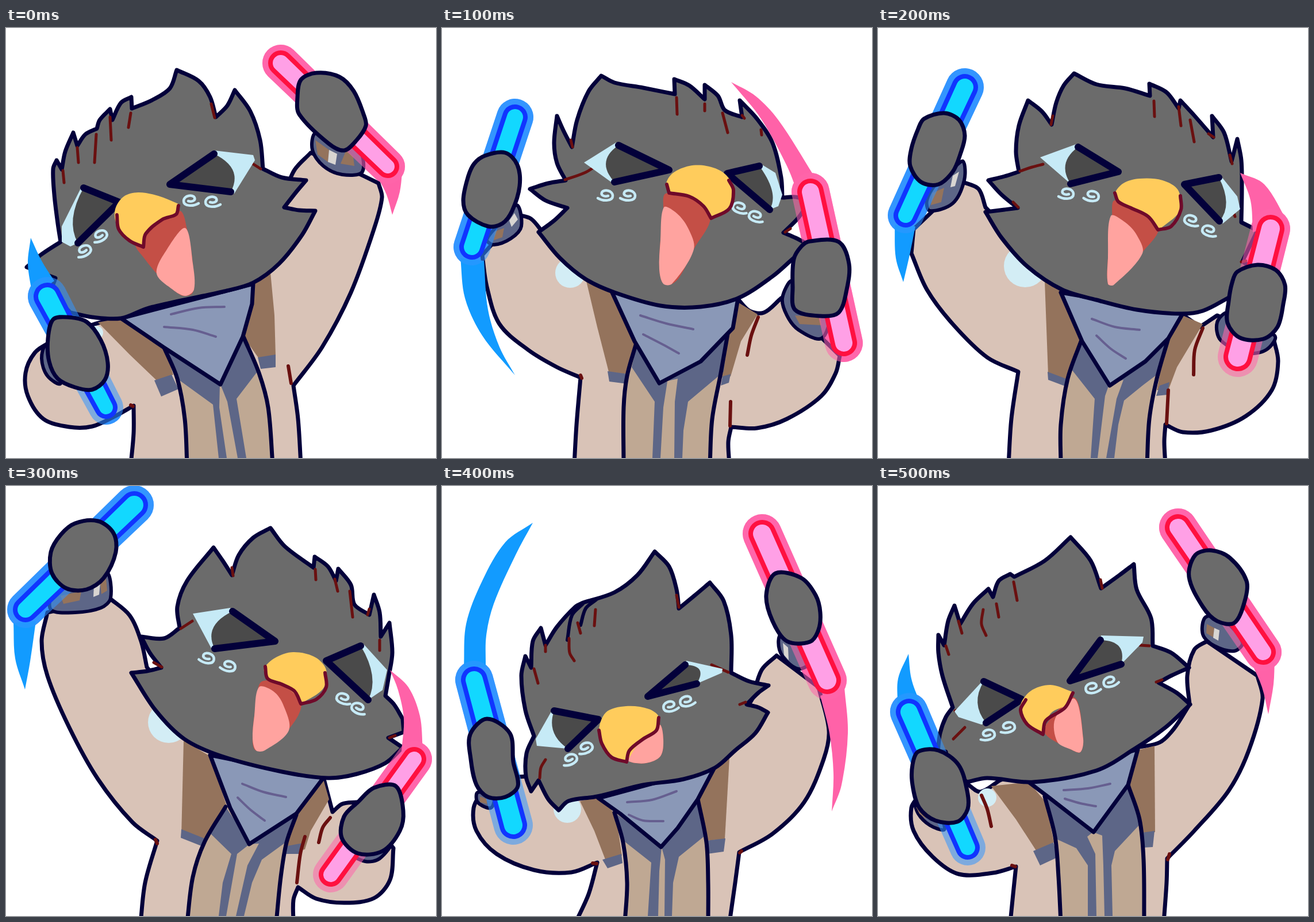
These frames come from a looping animation (748x748 px, 600 ms). An HTML page:

```html
<!DOCTYPE html>
<html lang="en">
<head>
<meta charset="utf-8">
<title>Glow stick dance</title>
<style>
html, body { margin: 0; width: 100%; height: 100%; overflow: hidden; background: #fff; }
svg { display: block; width: 100vw; height: 100vh; }
</style>
</head>
<body>
<svg id="stage" viewBox="0 0 748 748" stroke-linecap="round" stroke-linejoin="round"></svg>
<script>
// Points are "x,y"; "!" marks a sharp corner and "/" starts a new shape.
// Eyes: three lid points, then the outer rim. Sticks: x,y,radius for both ends (blue / pink).
const poses = [
  {
    body: '217,760! 222,705 222,657! 190,675 150,693 110,694 65,680 38,640 34,600 50,565 75,548 148,517 180,508 205,500! 430,440! 470,330! 500,250 530,217! 575,235 648,270! 654,295 640,350 600,460 550,555 500,622! 508,680 513,760!',
    creases: '491,588 496,618/217,656 221,658',
    badge: '157,530,12',
    brown: '160,512 200,505 275,555 291,603 262,613 215,568/428,445 460,425 467,500 469,570 440,575 413,537',
    slate: '258,613 288,603 300,628 270,641/438,573 469,568 469,590 443,593',
    panel: '275,556 298,610 311,680 315,760/413,537 440,600 456,660 464,760',
    collar: '275,556 372,620 371,660 384,748 370,748 360,655 302,613/413,537 373,620 385,650 403,748 418,748 401,645 437,598',
    scarf: '200,505 430,445 428,480 412,537 373,620 275,556',
    folds: '287,498 335,487 380,485/275,520 325,525 365,537',
    head: '95,372! 90,340 84,290 82,245 88,230! 97,246! 103,215 117,182! 124,205! 138,185 158,175! 163,160 181,141! 185,160! 200,130 218,120! 219,140! 255,125 285,105 297,73! 335,92 355,120 365,155! 385,135 398,108! 425,145 442,195 447,245! 480,260 522,265! 505,285 484,312! 510,317 538,318! 515,360 475,410 430,443 380,458 300,475 245,488 200,505 150,503 112,495! 80,460 86,435! 60,425 36,416! 60,395 95,372',
    cuts: '99,248 101,269/124,208 126,234/157,185 154,234/181,155 183,195/217,148 213,173/357,132 363,156/429,236 443,245',
    eyes: ['362,219 285,272 391,285 397,288 433,230 430,221 362,213', '135,278 197,303 125,374 112,380 97,372 97,345 131,277'],
    mouth: '225,375 240,400 265,430 305,465 325,460 325,410 315,350 302,318 250,345',
    tongue: '262,427 280,385 312,348 325,410 327,455 312,466 290,455',
    beak: '192,340 190,315 205,293 230,286 265,292 300,306! 300,318 290,330 268,334 246,350 240,380! 215,370',
    lip: '193,325 196,350 215,370 239,381! 243,358 272,333 296,324 300,309',
    swirls: '163,362,-30,-1 135,388,-30,-1 322,300,0,1 360,302,0,1',
    trails: ['43,365! 38,410 46,465! 84,440! 62,405', '648,262! 690,240! 685,285 672,325! 662,290'],
    cuffs: '70,550 62,575 72,605 95,618 95,550/538,183 533,212 552,240 585,255 620,250 612,205 570,195',
    patch: '538,195 562,212 560,233 542,220/592,212 604,224 606,240 582,236',
    pale: '562,212 576,219 573,238 560,233',
    sticks: ['72,467,24,174,660,20', '478,61,22,664,241,20'],
    hands: '82,507 107,503 140,511 165,543 177,582 172,612 150,629 120,625 90,610 75,580 73,540/540,78 580,85 605,110 622,150 626,170 610,195 588,213 560,200 510,150 507,120 513,90'
  },
  {
    body: '230,760! 234,690 241,608! 200,590 150,560 100,515 78,450 70,395! 133,325! 155,332 175,355! 250,400! 515,472! 535,492 560,495 590,470! 692,570! 685,600 660,640 600,680 548,696 503,694! 498,720 500,760!',
    creases: '241,604 243,609/550,503 538,535 531,569/502,650 501,692',
    badge: '223,426,26',
    brown: '250,436 292,455 337,548 328,603 290,598 270,520/513,476 549,498 520,545 502,606 487,608 497,540',
    slate: '288,597 331,603 330,620 291,615/488,606 502,602 499,617 485,622',
    panel: '338,548 322,605 316,660 316,760/500,515 485,600 470,680 466,760',
    collar: '340,545 376,618 392,615 385,660 380,748 366,748 370,650 330,590/500,510 460,555 375,618 410,610 405,650 404,748 418,748 420,700 428,650 490,598',
    scarf: '295,458 515,470 506,522 450,580 378,618 335,545',
    folds: '345,500 390,514 437,524/350,533 385,551 412,566',
    head: '153,280! 185,270 215,265! 200,235 195,200 200,153! 212,180 226,207! 235,160 255,110 277,83! 300,95 350,104 405,115! 404,89! 430,100 457,124! 457,99! 480,118 492,143 522,155! 518,126! 548,158 575,200 590,260 592,295! 615,294 640,300! 620,330 594,356! 615,365 640,378! 612,400 575,432 515,470 450,485 380,483 300,460 250,437 205,400 168,355! 195,335 218,313! 180,300 153,280',
    cuts: '408,121 409,150/457,132 457,144/488,148 497,182/522,152 526,157/555,177 556,186/224,195 227,207/597,355 606,349/214,264 250,251 273,236',
    eyes: ['307,204 395,247 300,268 297,270 247,234 303,199', '552,240 496,253 570,316 585,310 592,290 580,252 557,238'],
    mouth: '389,288 385,320 378,400 382,440 395,447 412,435 438,385 467,330 440,295',
    tongue: '386,312 380,370 378,420 385,445 400,445 438,385 428,348 408,322',
    beak: '390,270 402,252 430,240 460,240 490,252 507,278 500,312 469,332! 455,310 430,294 394,286!',
    lip: '391,272 395,287! 430,293 455,310 468,331! 500,314 507,282 499,265',
    swirls: '284,291,0,-1 323,291,0,-1 519,313,20,1 547,328,20,1',
    trails: ['32,400! 40,470 70,535 127,604! 100,555 80,490 73,405!', '503,94! 545,118 585,160 652,265! 645,290! 618,285! 600,240 555,158'],
    cuffs: '100,340 130,308 138,345 120,366 90,377 78,368/608,440 592,470 600,500 620,525 660,540 672,500 620,488',
    patch: '92,354 108,348 105,364 90,369/614,500 658,503 660,517 622,515',
    pale: '117,335 126,322 132,333 121,346',
    sticks: ['127,155,22,52,381,22', '641,285,23,699,548,23'],
    hands: '75,222 110,217 131,238 135,275 122,318 105,340 80,345 45,325 37,300 45,260 56,236/640,371 690,372 708,410 704,455 690,495 658,501 614,490 610,450 612,402 625,380'
  },
  {
    body: '227,760! 232,680 244,598! 190,573 130,515 85,455 58,392! 62,350! 148,268! 175,280 187,312! 300,430! 525,495! 560,520! 590,500! 688,540! 696,580 685,630 640,675 580,700 530,703 500,690! 498,720 500,760!',
    creases: '565,522 551,560 549,603/505,630 502,688',
    badge: '256,414,37',
    brown: '290,440 325,460 354,545 330,622 296,603/530,500 565,515 520,590 505,630 485,630 500,550',
    slate: '295,598 332,612 328,624 296,612/490,622 507,616 503,638 484,640',
    panel: '355,540 330,610 318,690 318,760/505,540 485,610 472,680 468,760',
    collar: '355,540 402,620 395,640 382,748 370,748 377,645 336,593/505,540 470,570 402,620 427,612 415,645 397,748 411,748 418,690 428,648 460,622 489,600',
    scarf: '318,460 530,497 505,540 465,580 403,622 355,545',
    folds: '372,506 412,520 455,525/380,535 405,558 431,575',
    head: '192,265! 220,258 245,250! 240,215 245,170 261,126! 285,145 302,168! 310,130 323,100 341,79! 380,98 430,105 473,118! 472,97! 502,112 523,140! 526,126! 550,152 583,190! 581,153! 602,182 615,232! 625,193! 632,230 633,280 632,338! 660,352! 634,406! 655,420! 612,468! 565,492 525,497 450,490 380,473 320,455 260,415 215,365 187,320! 220,316 243,313! 215,290 192,265',
    cuts: '247,249 268,242 287,237/235,303 244,312/304,153 301,168/480,127 481,154/523,137 527,170/543,160 550,198/575,184 584,190/612,221 616,236/618,319 621,328/632,407 640,405',
    eyes: ['348,207 418,250 335,271 282,225 345,202', '593,260 533,272 594,336 600,340 630,315 625,293 597,258'],
    mouth: '411,300 407,330 400,400 400,445 410,446 460,390 488,348 450,315',
    tongue: '405,327 400,400 400,445 410,447 460,392 450,360 430,338',
    beak: '412,288 427,270 455,262 495,265 522,282 525,318 490,350! 470,330 440,315 417,304!',
    lip: '412,287 418,302 440,313 470,328 487,351! 510,345 527,316 526,292',
    swirls: '327,288,0,-1 371,292,5,-1 546,335,20,1 577,353,20,1',
    trails: ['29,343! 31,400 44,442! 55,395 65,345!', '630,252! 672,272 714,340! 652,355! 648,300'],
    cuffs: '130,245 148,232 150,265 130,305 90,318 85,300 100,272/610,495 590,512 596,543 640,565 675,560 690,535',
    patch: '95,287 115,278 110,303 92,308',
    pale: '130,257 141,250 134,275 126,277',
    sticks: ['151,103,23,48,326,21', '683,349,24,626,572,25'],
    hands: '80,158 115,148 141,160 151,187 143,220 130,250 105,272 75,268 56,240 58,210 70,175/625,424 660,412 692,421 708,447 705,480 695,520 670,541 630,539 608,513 610,475 616,443'
  },
  {
    body: '234,760! 242,690 263,617! 220,585 160,510 110,420 72,330 62,270 72,220! 180,195! 215,225 235,270 245,315! 330,430! 553,510! 568,567! 585,553 610,550! 674,630! 668,685 640,717 590,725 540,718 508,698! 500,720 500,760!',
    creases: '564,577 551,594 544,620/520,610 512,640 506,690/260,615 263,622',
    badge: '283,411,36',
    brown: '309,443 355,470 384,557 345,625 305,610/552,510 562,545 530,600 520,632 487,640 500,572',
    slate: '305,597 345,613 342,627 304,612/490,626 517,621 512,640 484,640',
    panel: '382,558 345,620 325,680 315,760/505,572 488,620 478,680 470,760',
    collar: '382,558 425,622 402,640 383,748 370,748 377,690 392,640 355,604/505,572 423,623 440,622 420,660 400,748 414,748 428,690 445,650 489,618',
    scarf: '355,468 552,508 505,570 423,623 390,560',
    folds: '411,518 447,532 487,541/403,542 425,563 450,582',
    head: '235,262! 275,265 302,247! 298,210 315,165 361,107! 377,130 393,155! 405,120 430,90 460,73! 485,105 535,142! 537,123! 560,140 574,165! 578,144! 600,172 606,206 632,224! 640,189! 650,220 652,262! 667,238! 672,290 666,330 660,365! 675,380 690,405! 692,428! 665,438! 690,455! 660,482 610,501 560,508 480,497 375,470 310,440 260,390 218,325! 245,322 270,316! 250,290 235,262',
    cuts: '304,248 324,235/257,307 271,315/393,142 395,156/538,145 539,163/572,162 577,183/598,183 603,228/632,214 629,224/650,268 650,286/667,438 677,434',
    eyes: ['394,218 468,270 363,283 357,282 325,222 390,212', '617,278 557,304 630,372 655,355 663,320 622,275'],
    mouth: '445,340 435,380 429,430 432,458 445,460 490,425 514,380 490,350',
    tongue: '440,350 432,400 429,440 435,460 450,460 492,425 482,380 465,357',
    beak: '449,318 468,299 500,289 538,298 557,320 552,352 515,378! 498,358 475,344 454,335!',
    lip: '451,314 455,335 480,345 502,357 513,379! 540,371 557,350 555,325',
    swirls: '349,299,10,-1 386,313,10,-1 588,370,20,1 614,387,25,1',
    trails: ['13,238! 16,300 33,354! 42,305 52,235!', '668,320! 700,350 720,400 725,458! 688,462! 692,405 682,355'],
    cuffs: '85,180 78,215 120,220 165,212 182,195 175,150 140,175/600,638 625,653 650,648 670,620',
    patch: '95,191 131,183 128,199 100,205/164,170 174,160 176,182 166,188',
    pale: '153,173 164,168 162,189 152,193',
    sticks: ['223,33,24,34,215,22', '710,475,21,565,676,21'],
    hands: '120,65 160,61 187,82 191,115 170,160 140,180 105,178 80,152 78,115 95,85/640,525 678,522 691,565 685,600 655,635 612,639 584,612 588,575 612,550'
  },
  {
    body: '232,760! 255,710 270,655! 225,672 160,668 95,640 60,600 55,560 70,530! 130,507 152,505! 200,530! 475,480! 540,370! 556,320 582,295! 655,350! 673,425 664,475 630,550 575,605 517,637! 510,690 500,760!',
    creases: '262,656 269,657/518,638 521,635',
    badge: '218,562,24',
    brown: '240,548 278,540 303,575 313,643 285,652 265,600/472,490 500,473 492,614 460,617 445,547',
    slate: '279,650 312,640 314,656 288,665/459,617 493,613 490,636 461,640',
    panel: '300,568 315,620 322,690 318,760/445,545 460,620 463,690 463,760',
    collar: '300,568 382,628 378,670 376,748 358,748 364,655 317,618/445,545 382,628 388,650 387,748 400,748 402,690 412,645 459,607',
    scarf: '272,543 475,488 445,545 410,595 381,628 310,570',
    folds: '322,550 365,546 408,531/325,572 350,582 385,583',
    head: '160,435! 145,390 138,330 145,296! 155,316! 158,270 172,247! 180,277! 200,245 232,210 245,203! 300,185 340,155 370,114! 395,140 408,180 412,213! 440,190 466,168! 490,200 503,260 503,325! 535,340 568,347! 550,360 530,380! 550,385 567,394! 545,430 510,460 475,490 420,510 350,520 270,540 220,548 203,564! 185,545 168,512! 155,531! 146,505 147,465 160,435',
    strands: '218,268 226,225 245,205/241,242 250,213 268,198',
    cuts: '160,318 167,343/180,277 180,288/221,265 222,290 230,304/236,238 241,256/267,215 265,243/408,190 412,211/469,311 498,324/518,380 528,376/180,476 172,490 170,508',
    eyes: ['423,311 358,366 443,344 487,325 488,318 425,304', '195,391 272,406 219,457 165,452 163,440 192,389'],
    mouth: '325,470 345,445 378,415 385,440 380,470 355,482 325,479',
    tongue: '325,470 345,445 378,415 385,440 380,470 355,482 325,479',
    beak: '273,430 285,394 320,383 360,388 378,403 372,427 345,444 322,479! 290,465',
    lip: '273,425 278,448 295,472 321,480! 326,460 350,440 373,425 377,403',
    swirls: '222,476,-25,-1 249,456,-25,-1 398,383,-10,1 427,374,-10,1',
    trails: ['158,64! 128,120 90,205 77,260 76,315! 38,315! 42,240 70,165 110,98', '658,365! 700,350! 706,430 695,520 678,566! 681,500 674,430'],
    cuffs: '62,533 62,550 85,560 90,540/590,258 587,285 605,310 625,318 660,290 640,262',
    patch: '66,540 78,545 78,553 66,550',
    pale: '593,273 602,281 603,303 595,294',
    sticks: ['56,337,23,124,590,24', '557,83,24,670,338,24'],
    hands: '78,405 118,430 124,480 132,522 110,541 80,541 60,520 50,475 49,432/580,152 625,160 650,190 658,220 655,250 640,271 600,270 575,235 564,190'
  },
  {
    body: '230,760! 235,710 240,662! 200,673 140,675 95,645 62,600 58,560 70,540! 155,518! 178,532 212,512! 350,450! 450,455! 490,446 515,422 542,380! 538,330 550,285 572,270! 660,330! 669,370 645,460 610,530 550,600 503,648! 502,690 497,760!',
    creases: '180,538 190,562 197,592/233,660 239,662/504,650 507,640',
    badge: '190,542,16',
    brown: '197,522 262,515 292,550 306,620 275,634 240,580/450,460 481,452 482,602 460,604 435,520',
    slate: '270,635 305,620 312,646 282,660/459,603 481,600 478,628 462,629',
    panel: '290,540 308,610 314,680 318,760/435,520 455,580 462,650 463,760',
    collar: '290,540 374,602 364,610 378,640 380,748 365,748 365,660 345,630 308,613/435,520 374,602 390,608 392,660 394,748 408,748 406,660 412,635 456,588',
    scarf: '262,515 452,458 435,520 375,602 295,540',
    folds: '323,529 365,526 404,518/325,544 352,552 379,557',
    head: '130,385! 112,330 105,290 105,259! 115,277! 122,235 133,208! 143,240! 165,205 192,179! 200,193! 210,165 230,153! 237,158! 290,130 335,89! 370,130 388,178! 420,155 445,136! 450,180 475,230 478,278! 510,290 541,316! 510,330 488,342! 520,360 543,380! 500,420 445,458 380,495 270,515 190,508 155,515! 125,490 118,462! 104,462! 108,430 118,402 130,385',
    cuts: '118,278 123,293/140,235 146,256/183,215 180,240 188,260/206,205 210,228/236,167 242,199/387,163 390,178/456,277 472,278/484,341 494,337/131,440 151,420/134,391 143,388',
    eyes: ['387,268 334,339 423,310 460,272 462,262 388,260', '184,340 250,371 188,412 180,415 140,402 133,392 182,339'],
    mouth: '290,430 300,405 342,368 357,440 352,463 335,458',
    tongue: '312,445 308,405 342,370 357,440 352,463 335,458',
    beak: '247,385 265,357 300,346 338,358! 332,378 300,396 288,432! 260,415',
    lip: '257,372 248,390 260,415 287,432! 292,408 325,386 339,360',
    swirls: '190,433,-15,-1 225,420,-15,-1 374,351,-10,1 405,340,-15,1',
    trails: ['53,292! 35,335 34,378! 72,375! 58,335', '650,308! 690,300! 688,345 679,397! 668,350'],
    cuffs: '65,548 70,570 90,590 115,598 110,580/570,228 565,258 585,278 620,287 634,272 600,232',
    patch: '572,240 585,247 583,263 571,256/66,558 76,565 84,580 72,570',
    pale: '585,247 594,251 592,269 583,264',
    sticks: ['54,393,23,156,629,21', '522,72,23,670,289,22'],
    hands: '70,462 105,460 140,485 155,530 156,562 138,584 100,582 72,560 60,520 60,485/552,120 580,112 612,125 641,165 638,200 620,238 590,235 565,210 541,158'
  }
];

const NAVY = '#03003a', GREY = '#6b6b6b', TAN = '#bfa893', SLATE = '#5d6687',
      BROWN = '#94735c', PALE = '#c6eaf6', RED = '#6a1010';
const stickInk = [
  { core: '#12d8ff', ring: '#1035ff', glow: '#3395ff', trail: '#129bff' },
  { core: '#ffa0e6', ring: '#ff1040', glow: '#ff66ac', trail: '#ff62a8' }
];

const points = s => s.split(' ').map(t => ({
  corner: t.endsWith('!'), at: t.replace('!', '').split(',').map(Number)
}));
const gap = (a, b) => Math.hypot(a[0] - b[0], a[1] - b[1]);

// One third of the tangent at b, scaled for the span b-c.
function handle(a, b, c) {
  const k = gap(b, c) / (gap(a, b) + gap(b, c) || 1) / 3;
  return [(c[0] - a[0]) * k, (c[1] - a[1]) * k];
}

function curve(s, closed) {
  const p = points(s), n = p.length;
  const near = (i, step) => {
    const j = i + step;
    return p[i].corner || (!closed && (j < 0 || j >= n)) ? p[i].at : p[(j + n) % n].at;
  };
  let d = 'M' + p[0].at;
  for (let i = 0; i < n - (closed ? 0 : 1); i++) {
    const j = (i + 1) % n, a = p[i].at, b = p[j].at;
    const u = handle(near(i, -1), a, b), v = handle(near(j, 1), b, a);
    d += `C${a[0] + u[0]},${a[1] + u[1]} ${b[0] + v[0]},${b[1] + v[1]} ${b}`;
  }
  return d + (closed ? 'Z' : '');
}

const tag = (d, fill, stroke = 'none', width = 0, extra = '') =>
  `<path d="${d}" fill="${fill}" stroke="${stroke}" stroke-width="${width}" ${extra}/>`;
const each = (s, draw) => (s ? s.split('/').map(draw).join('') : '');
const blob = (s, fill, stroke, width) => each(s, q => tag(curve(q, true), fill, stroke, width));
const line = (s, stroke, width) => each(s, q => tag(curve(q), 'none', stroke, width));
const poly = (s, fill, stroke, width) => each(s, q => tag(`M${q}Z`, fill, stroke, width));

function capsule(s, grow) {
  const [x, y, r, X, Y, R] = s.split(',').map(Number);
  const len = Math.hypot(X - x, Y - y), nx = (y - Y) / len, ny = (X - x) / len;
  const a = r + grow, b = R + grow;
  return `M${x + nx * a},${y + ny * a}A${a},${a} 0 0 1 ${x - nx * a},${y - ny * a}` +
    `L${X - nx * b},${Y - ny * b}A${b},${b} 0 0 1 ${X + nx * b},${Y + ny * b}Z`;
}

function panel(s) {
  const [left, right] = s.split('/');
  const back = right.split(' ').reverse().join(' ');
  return tag(curve(left) + curve(back).replace('M', 'L') + 'Z', TAN);
}

function eye(s) {
  const p = points(s).map(q => q.at), [a, b, c] = p;
  const bulge = [0, 1].map(k => (a[k] + c[k]) / 2 * 1.4 - b[k] * 0.4);
  return poly([a, c, ...p.slice(3)].join(' '), PALE) +
    tag(`M${a}L${b}L${c}Q${bulge} ${a}`, '#4a4a4a') +
    tag(`M${a}L${b}L${c}`, 'none', NAVY, 12);
}

const swirl = s => {
  const [x, y, turn, flip] = s.split(',');
  return tag('M-5,1C2,3 8,0 6,-5C3,-11 -13,-9 -13,1C-13,10 3,11 13,5', 'none', PALE, 4.5,
    `transform="translate(${x} ${y}) rotate(${turn}) scale(${flip} 1)"`);
};

function badge(s) {
  const [x, y, r] = s.split(',');
  return `<circle cx="${x}" cy="${y}" r="${r}" fill="#d3edf5"/>`;
}

function figure(p) {
  const glow = extra => p.sticks.map((s, i) => tag(capsule(s, 10), stickInk[i].glow, 'none', 0, extra)).join('');
  return [
    glow(''),
    blob(p.body, '#d9c3b7', NAVY, 7), badge(p.badge),
    poly(p.brown, BROWN), poly(p.slate, SLATE),
    panel(p.panel), poly(p.collar, SLATE), line(p.panel, NAVY, 7),
    line(p.creases, RED, 6),
    poly(p.scarf, '#8a98b7', NAVY, 7), line(p.folds, '#665f90', 4),
    blob(p.head, GREY, NAVY, 7), line(p.strands, NAVY, 6), line(p.cuts, RED, 5),
    p.eyes.map(eye).join(''), p.swirls.split(' ').map(swirl).join(''),
    blob(p.mouth, '#c44f46'), blob(p.tongue, '#ffa39f'),
    blob(p.beak, '#ffcc5c'), line(p.lip, '#6f0a2a', 6),
    blob(p.cuffs, SLATE, NAVY, 6), poly(p.patch, BROWN), poly(p.pale, '#d8d5d2'),
    p.trails.map((s, i) => blob(s, stickInk[i].trail)).join(''),
    glow('opacity=".55"'),
    p.sticks.map((s, i) => tag(capsule(s, -4), stickInk[i].core, stickInk[i].ring, 8)).join(''),
    blob(p.hands, GREY, NAVY, 7)
  ].join('');
}

const stage = document.getElementById('stage');
const drawings = poses.map(figure);
let shown = -1;

function render(ms) {
  const i = Math.floor(ms / 100) % poses.length;
  if (i !== shown) stage.innerHTML = drawings[shown = i];
}

function tick() {
  render(performance.now());
  requestAnimationFrame(tick);
}
tick();
</script>
</body>
</html>
```
